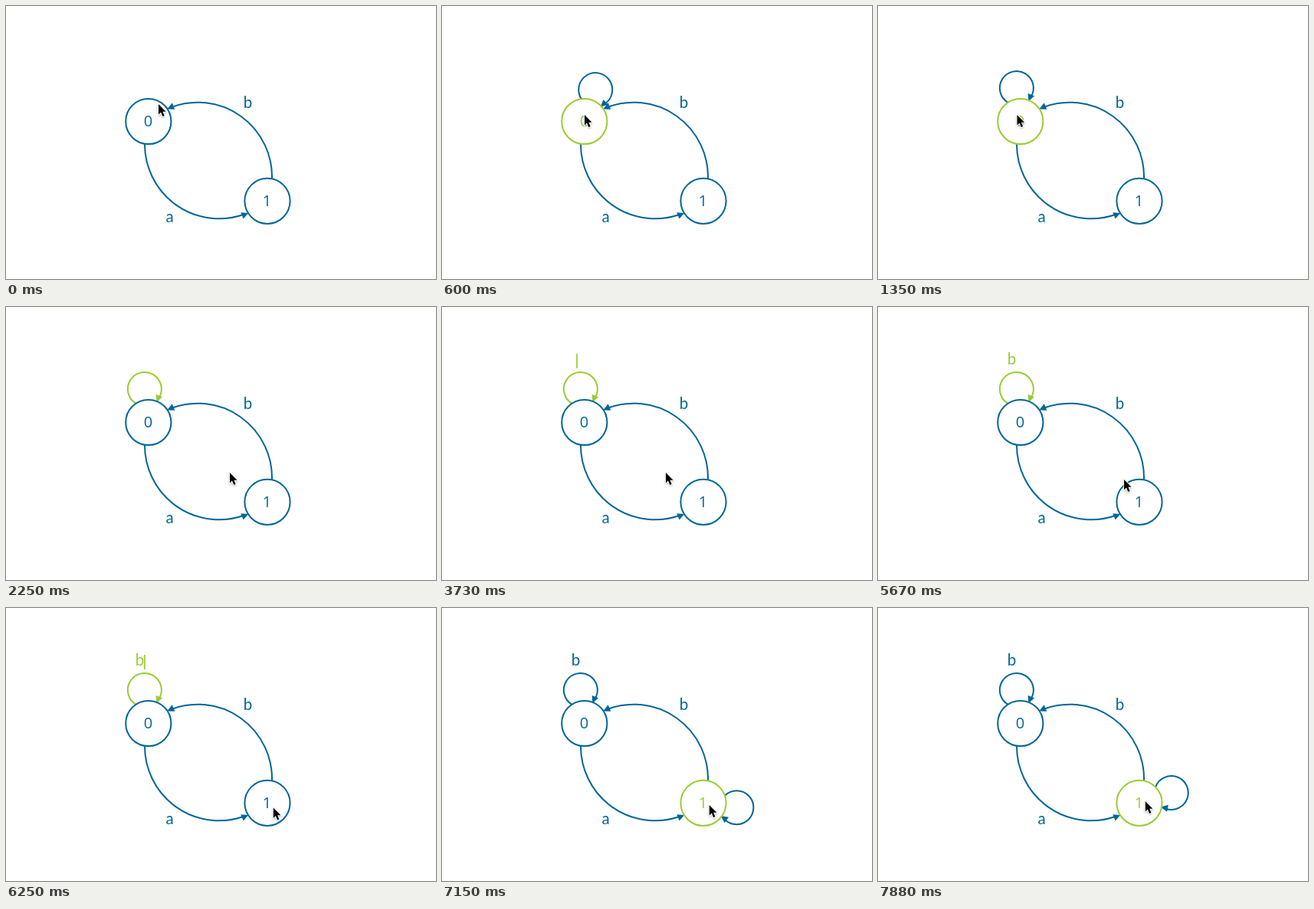
Animation, 561 px wide and 356 px high, one loop 8 s. Source, as an HTML page:

```html
<!DOCTYPE html>
<html lang="en">
<head>
<meta charset="utf-8">
<title>State machine editor</title>
<style>
  html, body { margin: 0; width: 100%; height: 100%; overflow: hidden; background: #fff; }
  svg { display: block; width: 100%; height: 100%; }
  text { font: 20.5px Lato, "Open Sans", sans-serif; text-anchor: middle; }
  .digit { font: 20px "Open Sans", "Noto Sans", sans-serif; }
  .line { fill: none; stroke-width: 2; }
</style>
</head>
<body>
<svg viewBox="0 0 561 356">
  <defs>
    <filter id="shade" x="-50%" y="-50%" width="200%" height="200%">
      <feDropShadow dx="0" dy="1" stdDeviation="0.8" flood-opacity="0.35"/>
    </filter>
  </defs>
  <g fill="#069">
    <path class="line" stroke="#069" d="M347 225A97 97 0 0 0 215.5 132"/>
    <path d="M210.2 134.4L220.3 134.7L216.7 126.3Z"/>
    <path class="line" stroke="#069" d="M181 180A97 97 0 0 0 311 271.5"/>
    <path d="M316.2 270L309.7 277.6L306.2 269.2Z"/>
    <text x="315.5" y="133.4">b</text>
    <text x="213.5" y="281.8">a</text>
  </g>
  <g id="loop0"><path class="line"/><path/></g>
  <g id="loop1"><path class="line"/><path/></g>
  <g id="state0"><circle class="line" r="29.6"/><text class="digit" x="-0.3" y="6.2">0</text></g>
  <g id="state1"><circle class="line" r="29.6"/><text class="digit" x="-0.5" y="6.2">1</text></g>
  <text id="label" x="174.5" y="75.2"></text>
  <path id="caret" class="line" stroke="#9c3" style="stroke-width:1.7" d="M0 61V80"/>
  <path id="cursor" stroke="#fff" stroke-width="1.6" paint-order="stroke" filter="url(#shade)"
        d="M0 0V13.4L3 10.6L5.3 16L7.7 15L5.4 9.7H9.6Z"/>
</svg>
<script>
const LOOP = 8000, BEAT = 148.67, BLINK = 3.4;
const BLUE = '#069', GREEN = '#9c3';
const SELECT = 4, EDIT = 11, DONE = 43; // beats
const $ = id => document.getElementById(id);

const states = [{ x: 185.8, y: 150.5 }, { x: 341, y: 254.3 }];

// Pointer glides: start beat, end beat, destination.
const home = { x: 199, y: 128 };
const glides = [
  [0, 1, 186, 142], [6, 9, 181.5, 142], [13, 15, 292, 216], [27, 29, 321, 225],
  [38, 42, 348.8, 260.5], [45, 48, 348.8, 257], [48, 50, 346.5, 245.5], [51, 53, 348.8, 252]
];
// Key presses: beat, resulting label.
const presses = [[10.5, ''], [25.1, 'a'], [32.5, ''], [33.8, 'b']];

const clamp = v => Math.min(1, Math.max(0, v));
const show = (el, on) => { el.style.display = on ? '' : 'none'; };
const move = (el, x, y, turn = 0) =>
  el.setAttribute('transform', `translate(${x} ${y}) rotate(${turn})`);

function pointer(beat) {
  let { x, y } = home;
  for (const [from, to, tx, ty] of glides) {
    const k = clamp((beat - from) / (to - from));
    x += (tx - x) * k;
    y += (ty - y) * k;
  }
  return { x, y };
}

// A self loop leans from its state's centre towards the pointer.
function lean(state, beat) {
  const p = pointer(beat);
  return Math.atan2(p.y - 1.2 - state.y, p.x + 3.2 - state.x) * 180 / Math.PI;
}

function paint(id, color) {
  const [shape, mark] = $(id).children;
  shape.setAttribute('stroke', color);
  mark.setAttribute('fill', color);
}

states.forEach((s, i) => {
  const [arc, head] = $('loop' + i).children;
  arc.setAttribute('d', 'M26.4 -13.5A22 22 0 1 1 30.5 17.5');
  head.setAttribute('d', 'M24.6 13.4L35.2 13.9L31 21.9Z');
  move($('state' + i), s.x, s.y);
});

function render(t) {
  const beat = Math.floor(t / BEAT);
  const p = pointer(beat);
  move($('cursor'), p.x, p.y);

  const editing = beat >= EDIT && beat < DONE;
  const tint = editing ? GREEN : BLUE;
  paint('state0', beat >= SELECT && beat < EDIT ? GREEN : BLUE);
  paint('state1', beat >= DONE ? GREEN : BLUE);
  paint('loop0', tint);
  paint('loop1', BLUE);

  [[SELECT, EDIT], [DONE, Infinity]].forEach(([from, to], i) => {
    const loop = $('loop' + i), s = states[i];
    show(loop, beat >= from);
    move(loop, s.x, s.y, lean(s, Math.min(beat, to)));
  });

  const [pressed, text] = presses.findLast(k => k[0] <= beat) || [0, ''];
  const label = $('label');
  label.textContent = text;
  label.setAttribute('fill', tint);
  show($('caret'), editing && Math.floor((beat - pressed) / BLINK) % 2 === 0);
  move($('caret'), 175.6 + (text ? label.getComputedTextLength() / 2 - 0.5 : 0.4), 0);
}

const start = performance.now();
function tick() {
  render((performance.now() - start) % LOOP);
  requestAnimationFrame(tick);
}
tick();
</script>
</body>
</html>
```
